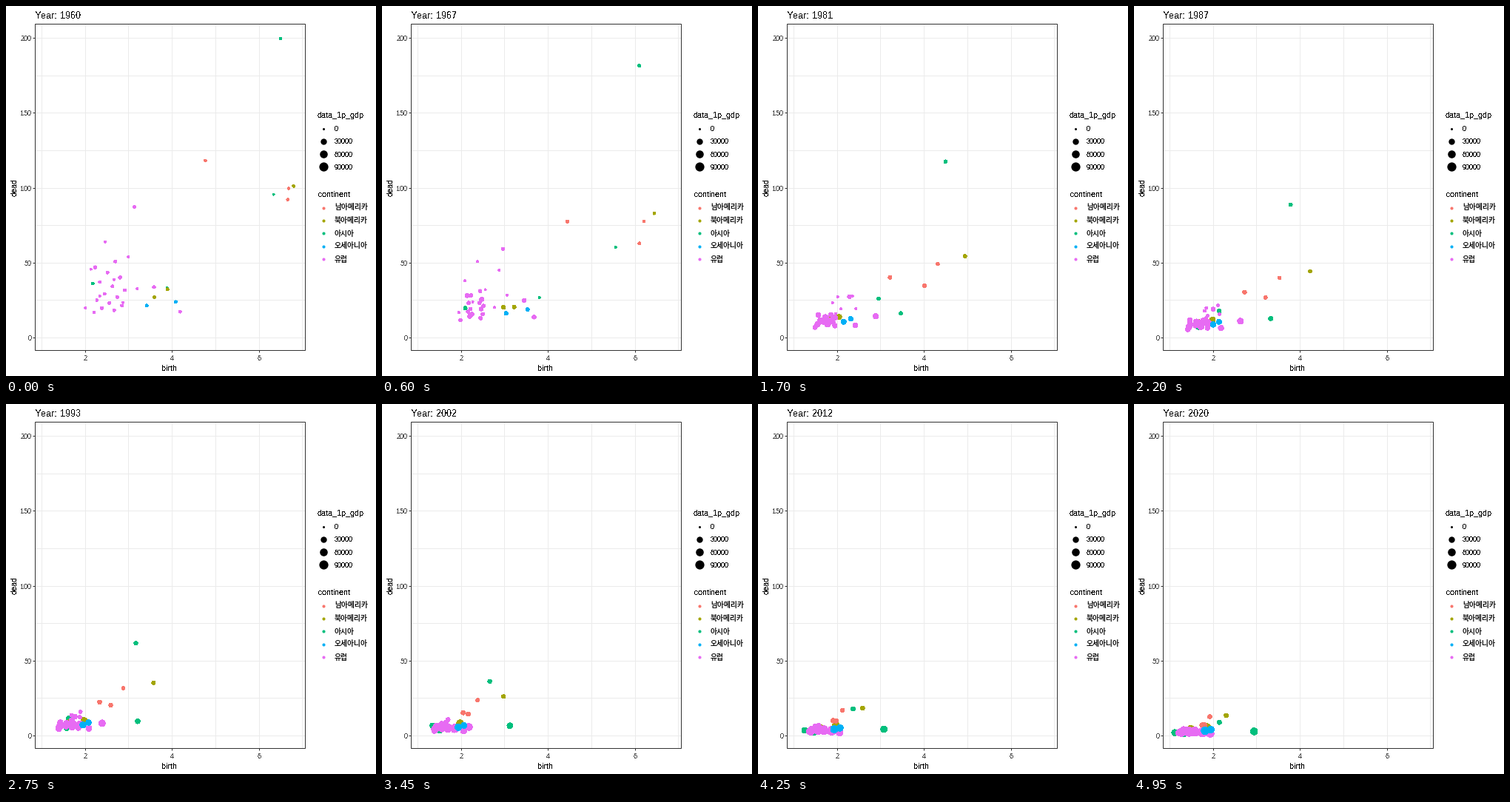
Animation of 500x500 px, one loop 5 s. Source, as a matplotlib script:

```python
import numpy as np
import matplotlib.pyplot as plt
from matplotlib.animation import FuncAnimation
from matplotlib.patches import Rectangle

SIZE, FRAMES, INTERVAL = 500, 100, 50
PT = 0.72  # points per pixel at 100 dpi
SANS, HANGUL = "Liberation Sans", "Noto Sans CJK JP"
GREY, GRID, EDGE = "#4D4D4D", "#EBEBEB", "#333333"
LEFT, TOP, RIGHT, BOTTOM = 39.5, 24.5, 404.5, 465.5

SOUTH, NORTH, ASIA = "#F8766D", "#A3A500", "#00BF7D"
OCEANIA, EUROPE = "#00B0F6", "#E76BF3"

# Crisp, fully hinted screen text
plt.rcParams.update({"text.antialiased": False, "text.hinting": "native",
                     "text.hinting_factor": 1})

t = np.linspace(0, 1, FRAMES)
late_dip = 0.12 * np.clip((t - 0.86) / 0.14, 0, 1)
colors, births, deaths, gdps = [], [], [], []


def country(color, birth, dead, gdp, pace, bend=1.0, opens=-0.05):
    """Add one dot from (start, end) pairs.

    Births fall along a bell curve, deaths shrink exponentially, and the
    gdp (in thousands) grows as a power of the time since it opens.
    """
    colors.append(color)
    fall = np.exp(-(pace * t) ** 1.8)
    births.append(birth[1] + (birth[0] - birth[1]) * fall - late_dip)
    deaths.append(dead[0] * (dead[1] / dead[0]) ** (t ** bend))
    gdps.append(gdp * np.clip((t - opens) / (1 - opens), 0, 1) ** 1.3)


def spread(i, low, high, step=0.618):
    """Evenly scattered value for the i-th member of a group."""
    return low + (high - low) * (i * step % 1)


country(ASIA, (6.49, 2.2), (199.8, 9.1), 9, 2.25, bend=1.65)
country(ASIA, (6.33, 1.23), (95.8, 2.2), 30, 3.05, opens=0.2)
country(ASIA, (3.88, 3.05), (33.2, 3), 44, 2.4, bend=1.15, opens=0.25)
country(ASIA, (2.17, 1.45), (36.3, 1.9), 45, 2.5, bend=0.75)
country(NORTH, (6.79, 2.3), (101.3, 13.6), 9, 2.05, bend=1.1)
country(NORTH, (3.59, 1.97), (27.2, 5.7), 60, 5.5, bend=0.8)
country(NORTH, (3.89, 1.6), (32.4, 4.5), 47, 4.6, bend=0.7)
country(SOUTH, (4.76, 1.85), (118.3, 7.1), 14, 2.5, bend=0.9)
country(SOUTH, (6.68, 2.0), (99.8, 12.8), 7, 2.4)
country(SOUTH, (6.655, 1.9), (92.3, 7.2), 12, 2.6, bend=0.9)

# Europe: three that stand apart, then the western and eastern groups
country(EUROPE, (3.13, 1.45), (87.4, 2.5), 22, 2.4, bend=1.05)
country(EUROPE, (3.58, 1.95), (33.9, 2.8), 70, 2.1)
country(EUROPE, (4.18, 2.05), (17.5, 1.6), 52, 4, bend=1.1)
for i in range(15):
    country(EUROPE,
            (spread(i, 2.2, 2.95), spread(i, 1.38, 1.98, 0.755)),
            (17 * 3 ** (i / 14), spread(i, 1.9, 3.5, 0.32)),
            30 + 75 * spread(i, 0, 1, 0.45) ** 3, 4.3, bend=0.85)
for i in range(8):
    country(EUROPE,
            (spread(i, 2, 3.4), spread(i, 1.3, 1.65, 0.755)),
            (20 * 3.2 ** (i / 7), spread(i, 2, 4.5, 0.32)),
            20, 2.1, bend=1.25, opens=0.4)

country(OCEANIA, (3.41, 1.93), (21.5, 3.5), 58, 4.2, bend=0.9)
country(OCEANIA, (4.08, 2.06), (24, 4.2), 42, 4.4, bend=0.95)


def to_x(birth):
    return 107.2 + (birth - 2) * 58.75


def to_y(dead):
    return 448.5 - dead * 2.025


def dot_area(size):
    diameter = 0.75 * (2.845 * size + 0.945) + 0.2
    return (diameter * PT) ** 2


def gdp_size(gdp):
    return 1 + 5 * np.sqrt(gdp / 121)


fig = plt.figure(figsize=(SIZE / 100, SIZE / 100), dpi=100, facecolor="white")
ax = fig.add_axes([0, 0, 1, 1])
ax.set(xlim=(0, SIZE), ylim=(SIZE, 0))
ax.axis("off")


def text(x, y, s, px, color="black", ha="left", va="baseline", font=SANS, **kw):
    return ax.text(x, y, s, fontsize=px * PT, color=color, ha=ha, va=va,
                   family=font, **kw)


def line(xs, ys, color):
    ax.plot(xs, ys, color=color, lw=PT, zorder=1, snap=False,
            solid_capstyle="butt")


def scatter(x, y, area, color):
    return ax.scatter(x, y, s=area, c=color, linewidths=0, zorder=3,
                      antialiased=False)


# Panel
for b in range(1, 8):
    x = int(to_x(b)) + 0.5
    line((x, x), (TOP, BOTTOM), GRID)
    if b % 2 == 0:
        line((x, x), (BOTTOM, BOTTOM + 3), EDGE)
        text(x, 479, str(b), 9, GREY, "center")
for d in range(0, 201, 25):
    y = int(to_y(d)) + 0.5
    line((LEFT, RIGHT), (y, y), GRID)
    if d % 50 == 0:
        line((LEFT - 3, LEFT), (y, y), EDGE)
        text(34.3, y + 3.5, str(d), 9, GREY, "right")
ax.add_patch(Rectangle((LEFT, TOP), RIGHT - LEFT, BOTTOM - TOP, fill=False,
                       ec=EDGE, lw=PT, zorder=5, snap=False))
text(220.5, 493, "birth", 11, ha="center")
text(12, 245, "dead", 11, ha="center", va="center", rotation=90)
title = text(39, 17, "", 13)

# Legends
text(421, 151, "data_1p_gdp", 11)
for i in range(4):
    y = 165.6 + 17.28 * i
    scatter([429.2], [y], dot_area(gdp_size(30 * i)), "black")
    text(444, y + 3.5, str(30000 * i), 9)
text(421, 258, "continent", 11)
continents = [("남아메리카", SOUTH), ("북아메리카", NORTH), ("아시아", ASIA),
              ("오세아니아", OCEANIA), ("유럽", EUROPE)]
for i, (name, color) in enumerate(continents):
    y = 272.6 + 17.4 * i
    scatter([429.2], [y], dot_area(1.5), color)
    text(444, y + 3.4, name, 9.7, font=HANGUL, antialiased=True)

xs, ys = to_x(np.array(births)), to_y(np.array(deaths))
areas = dot_area(gdp_size(np.array(gdps)))
dots = scatter(xs[:, 0], ys[:, 0], areas[:, 0], colors)


def draw(i):
    title.set_text(f"Year: {round(1960 + 60 * t[i])}")
    dots.set_offsets(np.column_stack([xs[:, i], ys[:, i]]))
    dots.set_sizes(areas[:, i])
    return title, dots


anim = FuncAnimation(fig, draw, frames=FRAMES, interval=INTERVAL, repeat=True,
                     repeat_delay=0)
plt.show()
```
